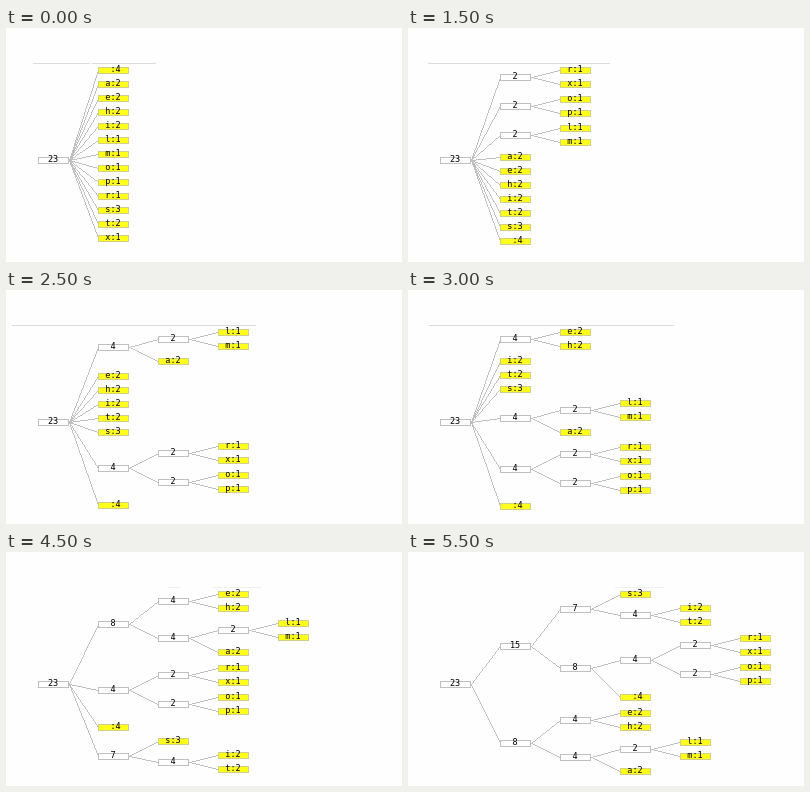
These frames come from a looping animation (396 by 234 pixels, 6.5 s). An HTML page with a canvas:

```html
<!DOCTYPE html>
<html lang="en">
<head>
<meta charset="utf-8">
<title>Huffman tree</title>
<style>
html, body { margin: 0; width: 396px; height: 234px; overflow: hidden; background: #fefefe; }
canvas { display: block; }
</style>
</head>
<body>
<canvas id="stage" width="396" height="234"></canvas>
<script>
const ctx = document.getElementById('stage').getContext('2d');
const STEP = 500, LOOP = 6500, TOP = 35, ROOT_Y = 132, PITCH = 60, BOX_W = 31;
const PAPER = '#fefefe', GREY = '#c0c0c0', YELLOW = '#ffff1c', YELLOW_EDGE = '#d0d08c';
const weights = { ' ': 4, a: 2, e: 2, h: 2, i: 2, l: 1, m: 1, o: 1, p: 1, r: 1, s: 3, t: 2, x: 1 };

// Start and end of the faint rule above the tree in each step
const rules = [
  [27, 84, 86, 150], [11, 205], [21, 201], [20, 202], [6, 250], [6, 250],
  [21, 266], [14, 266], [12, 268], [162, 175, 207, 256], [207, 256], [207, 256]
];

const leaf = ([char, weight]) => ({ label: char + ':' + weight, weight, height: 14, kids: [] });
const join = (a, b) => ({
  label: String(a.weight + b.weight),
  weight: a.weight + b.weight,
  height: a.height + b.height + 1,
  kids: [a, b]
});

// Every step sorts the forest, joins the two lightest trees and puts the result first
const steps = [Object.entries(weights).map(leaf)];
while (steps.length < 12) {
  const [a, b, ...rest] = [...steps[steps.length - 1]].sort((p, q) => p.weight - q.weight);
  steps.push([join(a, b), ...rest]);
}

function drawBox(label, x, y, fill, edge) {
  ctx.fillStyle = edge;
  ctx.fillRect(x, y - 3, BOX_W, 7);
  ctx.fillStyle = fill;
  ctx.fillRect(x + 1, y - 2, BOX_W - 2, 5);
  ctx.fillStyle = '#000';
  ctx.fillText(label, x + 15, y + 2);
}

// One-pixel line without smoothing
function drawLine(x1, y1, x2, y2) {
  const n = Math.max(Math.abs(x2 - x1), Math.abs(y2 - y1));
  ctx.fillStyle = GREY;
  for (let i = 0; i <= n; i++) {
    ctx.fillRect(Math.round(x1 + (x2 - x1) * i / n), Math.round(y1 + (y2 - y1) * i / n), 1, 1);
  }
}

function drawKids(kids, x, y, top) {
  const kidX = x + PITCH;
  for (const kid of kids) {
    const kidY = Math.floor(top + kid.height / 2);
    drawLine(x + BOX_W, y, kidX, kidY);
    drawKids(kid.kids, kidX, kidY, top);
    if (kid.kids.length) drawBox(kid.label, kidX, kidY, PAPER, GREY);
    else drawBox(kid.label, kidX, kidY, YELLOW, YELLOW_EDGE);
    top += kid.height;
  }
}

function drawRule(ends, fill) {
  ctx.fillStyle = fill;
  for (let i = 0; i < ends.length; i += 2) ctx.fillRect(ends[i], TOP, ends[i + 1] - ends[i], 1);
}

function draw(step) {
  ctx.fillStyle = PAPER;
  ctx.fillRect(0, 0, 396, 234);
  ctx.font = '8.5px "DejaVu Sans Mono", monospace';
  ctx.textAlign = 'center';
  drawRule(rules[step], step < 9 ? '#dcdcdc' : '#f0f0f0');
  drawKids(steps[step], 32, ROOT_Y, TOP);
  drawBox('23', 32, ROOT_Y, PAPER, GREY);
}

const start = performance.now();
function frame() {
  const time = (performance.now() - start) % LOOP;
  draw(Math.min(Math.floor(time / STEP), steps.length - 1));
  requestAnimationFrame(frame);
}
frame();
</script>
</body>
</html>
```
